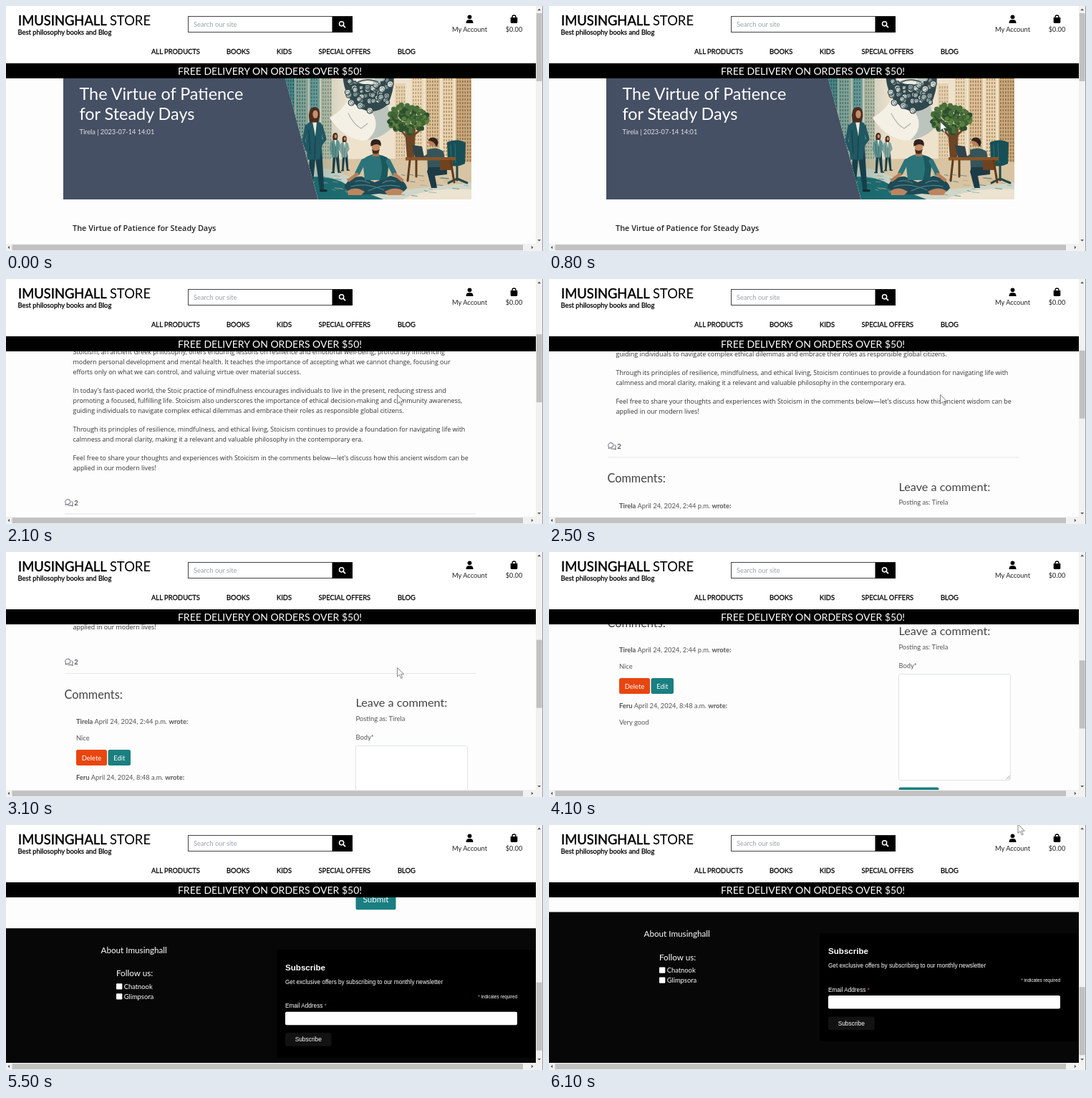
These frames come from a looping animation (750x342 px, 6.7 s). An HTML page:

```html
<!DOCTYPE html>
<html lang="en">
<head>
<meta charset="utf-8">
<title>Book store article</title>
<style>
html, body { margin: 0; width: 100%; height: 100%; overflow: hidden; background: #fff; }
svg { display: block; width: 750px; height: 342px; }
text { font-family: Lato, "Open Sans", sans-serif; font-size: 9.35px; white-space: pre; }
.prose text { font-family: "Open Sans", "Noto Sans", sans-serif; font-size: 8.92px; fill: #333; }
.prose .head { font-size: 10.9px; font-weight: 600; fill: #222; }
.arial text { font-family: "Liberation Sans", Arial, sans-serif; font-size: 8.2px; }
.medium { stroke: #000; stroke-width: .28px; }
.mid { text-anchor: middle; }
</style>
</head>
<body>
<svg id="stage" viewBox="0 0 750 342" xmlns="http://www.w3.org/2000/svg"></svg>
<script>
const LOOP = 6700, STEP = 100;

const rect = (x, y, w, h, fill, more = '') =>
  `<rect x="${x}" y="${y}" width="${w}" height="${h}" fill="${fill}" ${more}/>`;
const path = (d, fill, more = '') => `<path d="${d}" fill="${fill}" ${more}/>`;
const line = (d, color, width) =>
  path(d, 'none', `stroke="${color}" stroke-width="${width}" stroke-linecap="round" stroke-linejoin="round"`);
const dot = (x, y, r, fill, more = '') => `<circle cx="${x}" cy="${y}" r="${r}" fill="${fill}" ${more}/>`;
const text = (x, y, s, fill = '#000', size = 0, cls = '', more = '') =>
  `<text x="${x}" y="${y}" fill="${fill}" class="${cls}" ${size ? `style="font-size:${size}px"` : ''} ${more}>${s}</text>`;
const group = (y, body, cls = '') => `<g class="${cls}" transform="translate(0 ${y})">${body}</g>`;

let seed = 7;
const rnd = () => (seed = seed * 16807 % 2147483647) / 2147483647;
const pick = list => list[Math.floor(rnd() * list.length)];
const repeat = (n, fn) => Array.from({ length: n }, (_, i) => fn(i)).join('');

// Calls fn at random points inside an ellipse
const scatter = (n, cx, cy, rx, ry, fn) => repeat(n, () => {
  const a = rnd() * 2 * Math.PI, r = Math.sqrt(rnd());
  return fn(cx + Math.cos(a) * r * rx, cy + Math.sin(a) * r * ry);
});

function building(x, y, w, fill, pane) {
  let s = rect(x, y, w, 235 - y, fill);
  for (let j = y + 4; j < 215; j += 5)
    for (let i = x + 2; i < x + w - 2; i += 3.5) s += rect(i, j, 1.7, 3.2, pane);
  return s;
}

function city() {
  return rect(385, 70, 265, 201, '#eee2cd') +
    building(388, 84, 15, '#6f9c98', '#2f6b70') +
    building(404, 70, 18, '#b9bda6', '#4f8583') +
    building(424, 92, 14, '#86aaa2', '#3d7a7b') +
    building(440, 76, 15, '#cfc5a9', '#7f9d90') +
    building(543, 108, 15, '#e4d2b3', '#c4a67c') +
    building(566, 96, 17, '#ead9bb', '#c0a074') +
    building(586, 70, 20, '#dcc39c', '#a98458') +
    building(609, 92, 16, '#ead7b6', '#b59062') +
    building(628, 70, 22, '#cbab7e', '#96734a') +
    path('M385 220Q510 207 650 218V271H385Z', '#d8c4a2') +
    path('M385 225Q450 220 482 240T560 256 650 246V271H385Z', '#cfd6c8') +
    path('M415 240Q452 234 477 250L512 264 530 271H415Z', '#1d6c70') +
    path('M552 271Q590 252 650 256V271Z', '#ece3d0') +
    scatter(70, 520, 250, 125, 16, (x, y) => line(`M${x} ${y}l${4 + rnd() * 7} 1`, pick(['#88a69d', '#b99c70', '#39777a']), .7)) +
    '<linearGradient id="haze"><stop stop-color="#0e5a60" stop-opacity=".4"/><stop offset="1" stop-color="#0e5a60" stop-opacity="0"/></linearGradient>' +
    rect(385, 70, 95, 201, 'url(#haze)');
}

function bust() {
  const curl = (x, y) => {
    const r = 2.5 + rnd() * 2;
    return dot(x, y, r, pick(['#dfe0d8', '#b9c3bf', '#8b9d9d']), 'stroke="#2a4247" stroke-width="1.200"') +
      line(`M${x - r * .5} ${y}q${r * .5} ${-r} ${r} 0t${-r * .6} ${r * .4}`, '#40585b', .8);
  };
  return path('M452 156Q470 146 481 126L533 139Q534 152 548 160Q530 184 497 188Q468 182 452 156Z', '#f4f0e6') +
    path('M509 145L533 139Q534 152 548 160Q530 184 505 187Q526 168 509 145Z', '#bcc4be') +
    line('M478 150Q486 166 496 171L505 164', '#a9b3ae', 1.2) +
    path('M472 80H540Q546 112 533 138Q508 158 484 134Q466 112 472 80Z', '#30474c') +
    scatter(80, 508, 119, 33, 29, curl) +
    path('M484 75H526L528 100Q520 111 506 109Q489 110 483 98Z', '#efebe0') +
    path('M514 75H526L528 100Q520 111 512 108Q520 95 514 75Z', '#bfc6c0') +
    line('M492 106Q505 100 519 106', '#53676a', 2);
}

function tree() {
  return path('M557 172L560 214H570L572 172Z', '#6b4526') + line('M565 190L553 175M566 184L579 172', '#6b4526', 2.5) +
    scatter(150, 562, 157, 28, 20, (x, y) => dot(x, y, 1.6 + rnd() * 2.6, pick(['#3d6535', '#5d7f3e', '#2d4f2f', '#48703a'])));
}

function walker(x, y, k, suit) {
  return `<g transform="translate(${x} ${y}) scale(${k})">` +
    path('M-4 39L-7 113H-1L3 68 9 112H15L11 39Z', '#173f4b') +
    path('M-8 21Q0 14 11 20L13 47 9 70H-8L-10 44Z', suit) +
    path('M-1 18H5L3 38Z', '#efe8da') + line('M3 39L2 69M-6 30L-4 62', '#113740', .8) +
    line('M-9 24L-13 45-8 57', suit, 4.5) + line('M11 24L16 42 8 52', suit, 4.5) +
    path('M-6 9Q-5-3 3-2Q10-1 9 11L7 19H-5Z', '#4b2d20') +
    `<ellipse cx="3" cy="8" rx="3.600" ry="5.600" fill="#c98f68"/>` +
    rect(-10, 112, 10, 3, '#122a31') + rect(9, 111, 10, 3, '#122a31') + '</g>';
}

function sitter() {
  return path('M472 253Q479 237 497 238L515 246 537 237Q558 242 560 254Q553 266 521 262Q487 267 472 253Z', '#1f4a55') +
    line('M482 252Q503 246 528 257M550 252Q530 247 506 258M488 245Q498 242 508 247M544 245Q534 242 526 247', '#4f8288', 1.2) +
    path('M498 214Q507 207 515 207Q527 207 535 214L532 243H501Z', '#2b7479') +
    path('M522 209Q530 209 535 214L532 243H522Q528 228 522 209Z', '#1c575e') +
    line('M499 217L491 233M534 217L542 233', '#2b7479', 7) +
    line('M490 235L479 243M543 235L553 243', '#b97f58', 4.5) +
    rect(512, 200, 9, 10, '#a87150') +
    `<ellipse cx="516.500" cy="197" rx="5.600" ry="8.500" fill="#c58b64"/>` +
    path('M509.500 196Q508 185 517 186Q525 186 523.500 196Q519 190 509.500 196Z', '#2f211b') +
    path('M511 200Q516 204 522 200L520 205Q516 208 512 205Z', '#422c20') +
    path('M477 258Q488 251 501 259L496 264H478ZM529 259Q544 251 555 258L551 264H533Z', '#bd855e');
}

function desk() {
  return path('M616 190Q631 184 642 191L641 220Q630 226 617 222Z', '#174f56') +
    line('M621 194L622 218M627 192L628 219', '#2d7175', 1) +
    line('M630 222V243M618 247L630 241 644 247', '#24474a', 3) +
    path('M588 201Q600 195 611 203L616 230H589Z', '#35555a') +
    path('M590 225H616V235L599 237 602 254H594L588 231Z', '#1b3b46') +
    line('M595 205L585 212 574 210', '#35555a', 5) +
    dot(596, 190, 5.8, '#b97f5a') + path('M589.500 188Q593 181 601 185Q606 190 601 197Q599 188 589.500 188Z', '#33231c') +
    path('M567 194L581 196 584 211H571Z', '#2f4448') +
    rect(558, 211, 70, 4.5, '#8a5428') +
    rect(606, 215, 18, 14, '#70431f') +
    line('M564 216L561 244M621 216L626 246M573 216V238', '#623a1b', 3);
}

function hero() {
  return rect(80, 60, 400, 210, '#465064') +
    '<clipPath id="cut"><path d="M380 65H650V267Q650 270 647 270H436Z"/></clipPath>' +
    `<g clip-path="url(#cut)">${city()}${walker(459, 178, .48, '#5b8f8e')}${walker(472, 182, .42, '#7fa39c')}` +
    `${walker(405, 178, .46, '#36777a')}${bust()}${tree()}${walker(429, 143, 1.02, '#205863')}${desk()}${sitter()}</g>` +
    text(102.500, 131, 'The Virtue of Patience', '#fff', 23.4) +
    text(102.500, 159, 'for Steady Days', '#fff', 23.4) +
    text(102.500, 179, 'Tirela | 2023-07-14 14:01', '#dfe2e6', 9.2);
}

const paragraphs = [
  [338.500, 'Stoicism, an ancient Greek philosophy, offers enduring lessons on resilience and emotional well-being, profoundly influencing',
    'modern personal development and mental health. It teaches the importance of accepting what we cannot change, focusing our',
    'efforts only on what we can control, and valuing virtue over material success.'],
  [392.500, "In today's fast-paced world, the Stoic practice of mindfulness encourages individuals to live in the present, reducing stress and",
    'promoting a focused, fulfilling life. Stoicism also underscores the importance of ethical decision-making and community awareness,',
    'guiding individuals to navigate complex ethical dilemmas and embrace their roles as responsible global citizens.'],
  [446.500, 'Through its principles of resilience, mindfulness, and ethical living, Stoicism continues to provide a foundation for navigating life with',
    'calmness and moral clarity, making it a relevant and valuable philosophy in the contemporary era.'],
  [486.500, "Feel free to share your thoughts and experiences with Stoicism in the comments below—let's discuss how this ancient wisdom can be",
    'applied in our modern lives!']
];

const article = () => group(0,
  text(93, 314, 'The Virtue of Patience for Steady Days', '#222', 0, 'head') +
  paragraphs.map(([y, ...rows]) => rows.map((s, i) => text(93.500, y + i * 14, s)).join('')).join(''), 'prose');

const byline = (y, name, when) => text(98, y,
  `<tspan font-weight="700">${name}</tspan> ${when} <tspan font-weight="700">wrote:</tspan>`, '#555');
const button = (x, y, w, h, fill, label, base, size) =>
  rect(x, y, w, h, fill, 'rx="2.500"') + text(x + w / 2, base, label, '#fff', size, 'mid');

const comments = () => group(392.500,
  path('M86 149Q90 149 90 152.500T86 156L83 157 83.500 155Q81 151 86 149Z', 'none', 'stroke="#667" stroke-width="1"') +
  path('M91.500 151.500Q95 154 92.500 156.500L93.500 158.500 90 157.500Q87 158 86 157', 'none', 'stroke="#667" stroke-width="1"') +
  text(95.300, 157, '2', '#555', 9.35, '', 'font-weight="700"') +
  rect(82, 169, 574, 1, '#e6e6e6') +
  text(81.500, 204.500, 'Comments:', '#444', 16.3) +
  byline(240, 'Tirela', 'April 24, 2024, 2:44 p.m.') +
  text(98, 263, 'Nice', '#555') +
  button(98, 276, 43, 22, '#e84610', 'Delete', 290.500) +
  button(142.500, 276, 31.500, 22, '#1a7f80', 'Edit', 290.500) +
  byline(318, 'Feru', 'April 24, 2024, 8:48 a.m.') +
  text(98, 341, 'Very good', '#555') +
  text(488.500, 216, 'Leave a comment:', '#444', 16.2) +
  text(488.500, 235.500, 'Posting as: Tirela', '#555') +
  text(488.500, 261.500, 'Body*', '#555') +
  rect(488.500, 270.500, 156, 148, '#fff', 'rx="2" stroke="#dfe2e5"') +
  line('M639 417L643.500 412.500M642 417L643.500 415.500', '#777', .7) +
  button(488.500, 428.500, 56, 28, '#1a7f80', 'Submit', 446.500, 11.7));

const footer = () => group(753.500,
  rect(0, 121.500, 740, 240, '#070707') + rect(378, 151.500, 362, 150.500, '#000') +
  text(132.500, 156, 'About Imusinghall', '#fff', 11.7) +
  text(154, 188.500, 'Follow us:', '#fff', 11.7) +
  rect(154, 198.500, 8.300, 8.300, '#fff', 'rx="1"') + text(164.700, 206, 'Chatnook', '#fff') +
  rect(154, 212.500, 8.300, 8.300, '#fff', 'rx="1"') + text(164.700, 220, 'Glimpsora', '#fff') +
  group(0,
    text(390, 180, 'Subscribe', '#fff', 11.6, '', 'font-weight="700"') +
    text(390, 199, 'Get exclusive offers by subscribing to our monthly newsletter', '#fff') +
    text(714, 219, '<tspan fill="#e8a0a0">*</tspan> indicates required', '#fff', 6.4, '', 'text-anchor="end"') +
    text(390, 232.500, 'Email Address <tspan fill="#b06060">*</tspan>', '#fff') +
    rect(390, 238, 324, 18.500, '#fff', 'rx="2"') +
    button(390, 267.500, 64.500, 18.500, '#121212', 'Subscribe', 279.500, 8.4), 'arial'));

const header = () =>
  rect(0, 0, 740, 80, '#fff') + rect(0, 80, 740, 21, '#000') +
  text(17, 26.800, '<tspan stroke="#000" stroke-width=".450">IMUSINGHALL</tspan> STORE', '#000', 18.4) +
  text(16.500, 40, 'Best philosophy books and Blog', '#000', 9.4, 'medium') +
  rect(254.500, 14.500, 229, 22, '#fff', 'stroke="#444"') + rect(455.500, 14.500, 28.500, 22.500, '#000') +
  text(262, 29, 'Search our site', '#9ba3a8') +
  dot(468.600, 24.800, 3.100, 'none', 'stroke="#fff" stroke-width="1.500"') + line('M471 27.200L473.500 29.700', '#fff', 1.7) +
  dot(647.500, 15.300, 2.900, '#000') + path('M642.500 24Q642.500 19.300 646 19.300H649Q652.500 19.300 652.500 24Z', '#000') +
  path('M704.700 16H714.300V22.500Q714.300 24 712.500 24H706.500Q704.700 24 704.700 22.500Z', '#000') +
  path('M707 18V15.500Q707 13 709.500 13T712 15.500V18', 'none', 'stroke="#000" stroke-width="1.300"') +
  text(647.500, 36, 'My Account', '#222', 9.3, 'mid') + text(709.500, 36, '$0.00', '#222', 9.2, 'mid') +
  [[203, 'ALL PRODUCTS'], [308, 'BOOKS'], [378, 'KIDS'], [436.500, 'SPECIAL OFFERS'], [547, 'BLOG']]
    .map(([x, s]) => text(x, 67, s, '#000', 9.4, 'medium')).join('') +
  text(368.500, 95.800, 'FREE DELIVERY ON ORDERS OVER $50!', '#fff', 14, 'mid');

const bars = () =>
  rect(740, 0, 10, 342, '#f1f1f1') + rect(0, 332, 750, 10, '#f1f1f1') +
  rect(8.500, 333.200, 713.500, 7.800, '#c1c1c1') +
  '<rect id="thumb" x="740.800" y="10" width="7.800" height="95" fill="#c1c1c1"/>' +
  path('M742.300 6.200H747L744.650 3.600ZM742.300 326H747L744.650 328.600Z', '#555') +
  path('M5 334.800V339.200L2.500 337ZM733.800 334.800V339.200L736.300 337Z', '#555') +
  rect(749.200, 0, .8, 342, '#888');

document.getElementById('stage').innerHTML =
  rect(0, 0, 750, 342, '#fdfdfd') +
  `<g id="page">${hero()}${article()}${comments()}${footer()}</g>` + header() + bars() +
  '<path id="cursor" d="M0 0V12.500L3 9.800 5.200 14.800 7.200 14 5 9.200H9.200Z" fill="#fff" stroke="#666" stroke-width=".800"/>';

// [time, scroll offset]: wheel ticks with pauses between them
const scrollKeys = [[1400, 0], [1700, 110], [2100, 234], [2300, 234], [2500, 313], [2600, 313],
  [2800, 390], [2900, 390], [3100, 392.5], [3500, 471], [4000, 471], [4100, 492.5], [4200, 549.5],
  [4300, 549.5], [4600, 628], [4900, 628], [5100, 640], [5600, 753.5]];

function along(keys, t) {
  if (t <= keys[0][0]) return keys[0][1];
  for (let i = 1; i < keys.length; i++) {
    const [t0, a] = keys[i - 1], [t1, b] = keys[i];
    if (t <= t1) return a + (b - a) * (t - t0) / (t1 - t0);
  }
  return keys[keys.length - 1][1];
}

function pointer(t) {
  if (t >= 300 && t < 3200) return [along([[300, 600], [400, 546.5]], t), along([[300, 196], [400, 161.5]], t)];
  if (t >= 5700) return [along([[5700, 600], [6100, 655]], t), along([[5700, 300], [6100, -1]], t)];
  return [-50, -50];
}

const [page, thumb, cursor] = ['page', 'thumb', 'cursor'].map(id => document.getElementById(id));

function draw(now) {
  const t = Math.floor(now % LOOP / STEP) * STEP;
  const y = along(scrollKeys, t);
  page.setAttribute('transform', `translate(0 ${-y})`);
  thumb.setAttribute('y', 10 + y * .287);
  cursor.setAttribute('transform', `translate(${pointer(t)})`);
}

const start = performance.now();
function tick() {
  draw(performance.now() - start);
  requestAnimationFrame(tick);
}
tick();
</script>
</body>
</html>
```
